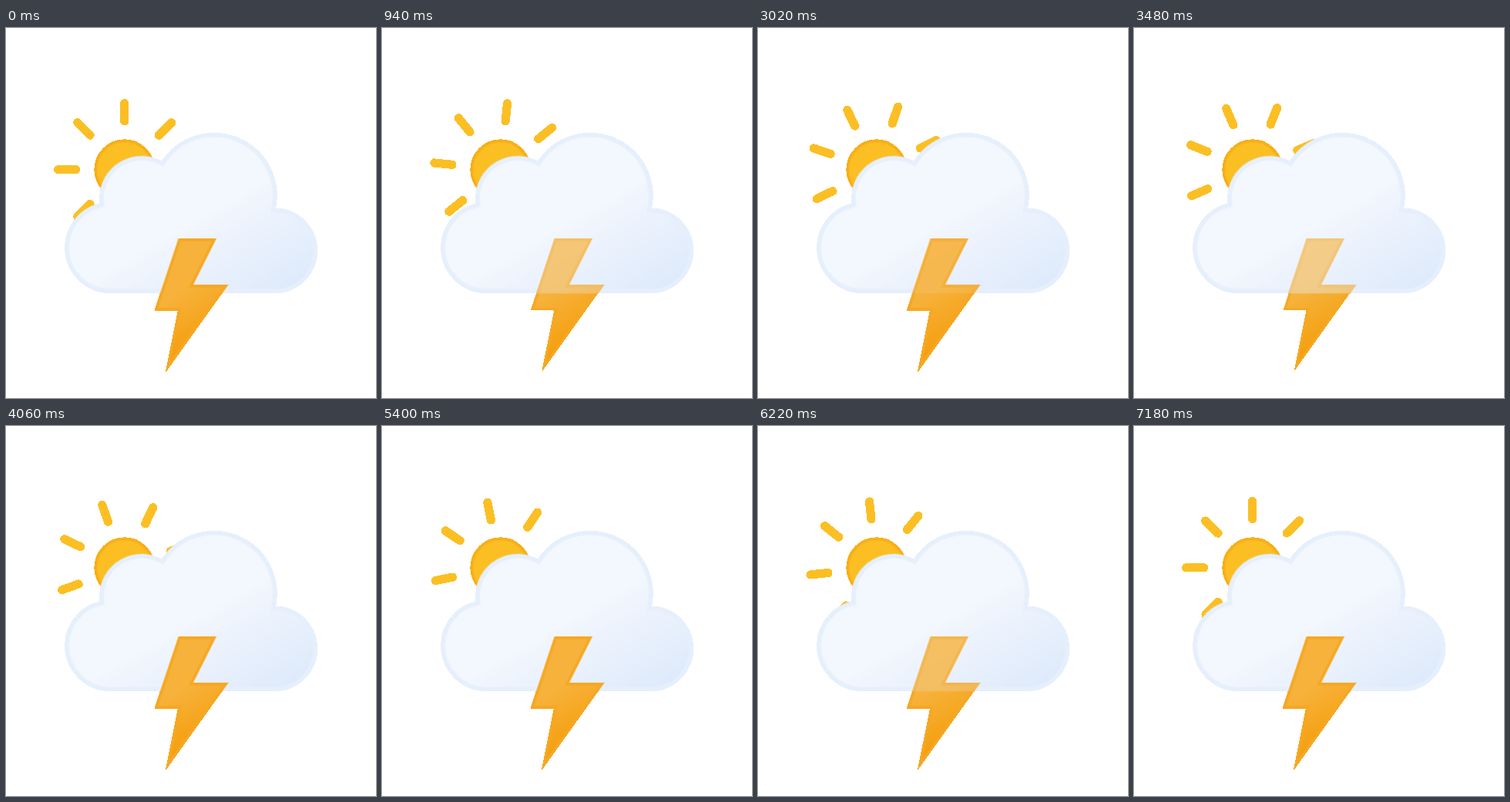
An HTML page without scripts that plays this animation: 480x480 px, repeating every 7220 ms.

```html
<!DOCTYPE html>
<html lang="en">
<head>
<meta charset="utf-8">
<title>Thunderstorm by day</title>
<style>
html, body { margin: 0; width: 100%; height: 100%; overflow: hidden; background: #fff; }
svg { display: block; width: 100vw; height: 100vh; }

.rays, .bolt { animation: 7.22s -2ms infinite; }
.rays {
  animation-name: spin;
  transform-origin: 164px 196px;
  fill: none;
  stroke: #fbbf24;
  stroke-width: 12;
  stroke-linecap: round;
}
.bolt { animation-name: flash; animation-timing-function: steps(10); }

@keyframes spin {
  0% { transform: rotate(0deg); animation-timing-function: steps(360); }
  99.723%, 100% { transform: rotate(45deg); }
}

/* three bursts of three flickers, the last flicker twice as fast */
@keyframes flash {
  0%, 8.31%, 13.85%, 22.161%,
  41.551%, 47.091%, 55.402%,
  74.792%, 80.332%, 88.643%, 100% { opacity: 1; }
  11.08%, 16.62%, 44.321%, 49.861%, 77.562%, 83.102% { opacity: 0; }
  19.391%, 52.632%, 85.873% { opacity: 1; animation-timing-function: steps(5); }
  20.776%, 54.017%, 87.258% { opacity: 0; animation-timing-function: steps(5); }
}
</style>
</head>
<body>
<svg viewBox="0 0 512 512">
  <defs>
    <linearGradient id="sunFill" gradientUnits="userSpaceOnUse" x1="144" y1="161.4" x2="184" y2="230.6">
      <stop offset=".45" stop-color="#fbbf24"/>
      <stop offset="1" stop-color="#f59e0b"/>
    </linearGradient>
    <linearGradient id="cloudFill" gradientUnits="userSpaceOnUse" x1="180.4" y1="175.7" x2="313.6" y2="406.4">
      <stop offset=".45" stop-color="#f3f7fe"/>
      <stop offset="1" stop-color="#deeafb"/>
    </linearGradient>
    <linearGradient id="boltFill" gradientUnits="userSpaceOnUse" x1="213.9" y1="307.1" x2="286.1" y2="432.2">
      <stop offset=".45" stop-color="#f7b23b"/>
      <stop offset="1" stop-color="#f59e0b"/>
    </linearGradient>
    <!-- one-bit alpha: hard outer edges, and the bolt below the cloud is either on or off -->
    <filter id="hard" filterUnits="userSpaceOnUse" x="0" y="0" width="512" height="512" color-interpolation-filters="sRGB">
      <feComponentTransfer>
        <feFuncA type="discrete" tableValues="0 1"/>
      </feComponentTransfer>
    </filter>
    <path id="ray" d="M164 104v24.6"/>
    <g id="cross">
      <use href="#ray"/>
      <use href="#ray" transform="rotate(90 164 196)"/>
      <use href="#ray" transform="rotate(180 164 196)"/>
      <use href="#ray" transform="rotate(270 164 196)"/>
    </g>
  </defs>

  <g filter="url(#hard)">
    <circle cx="164" cy="196" r="40" fill="url(#sunFill)" stroke="#f8af18" stroke-width="4"/>
    <g class="rays">
      <use href="#cross"/>
      <use href="#cross" transform="rotate(45 164 196)"/>
    </g>
    <path fill="url(#cloudFill)" stroke="#e6effc" stroke-width="6" stroke-miterlimit="10"
      d="M372 252c-.85 0-1.68.09-2.53.13A84 84 0 0 0 216.5 187.7A56 56 0 0 0 132 236a56 56 0 0 0 .8 9.08A60 60 0 0 0 144 364h228a56 56 0 0 0 0-112z"/>
    <path class="bolt" fill="url(#boltFill)" stroke="#f6a823" stroke-width="4" stroke-miterlimit="10"
      d="M240 293l-32 96h32l-16 80 80-112h-48l32-64z"/>
  </g>
</svg>
</body>
</html>
```
